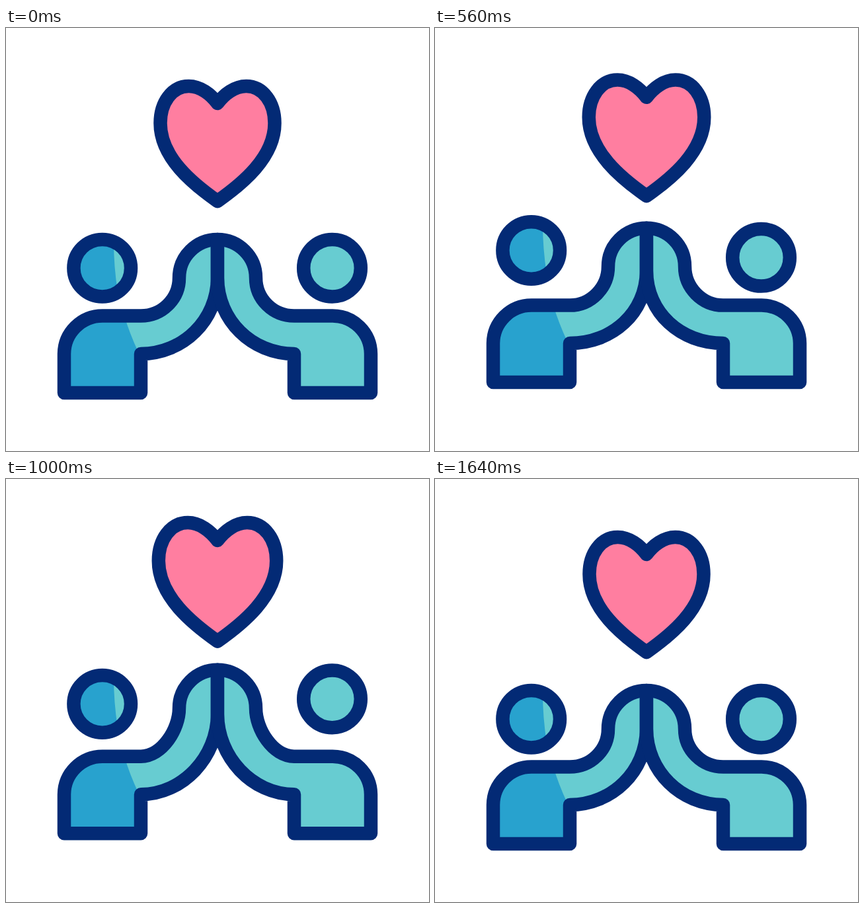
Write an HTML page that moves like this. It is 640 px wide and 640 px high and loops after 1.72 s.

```html
<!DOCTYPE html>
<html lang="en">
<head>
<meta charset="utf-8">
<title>High five</title>
<style>
  html, body { margin: 0; height: 100%; overflow: hidden; background: #fff; }
  svg { display: block; width: 100%; height: 100%; }
  .line { stroke: #032a75; stroke-width: 20.5; stroke-linejoin: round; }
  .teal { fill: #67ccd1; }
  .blue { fill: #28a2ce; }
</style>
</head>
<body>
<svg viewBox="0 0 640 640">
  <path id="heart" class="line" fill="#ff7ea0"
    d="M0-61C-10-74.5-26-87-43.500-87C-69-87-86.500-62-86.500-31C-86.500 21-37 61 0 87C37 61 86.500 21 86.500-31C86.500-62 69-87 43.500-87C26-87 10-74.500 0-61Z"/>
  <g id="left">
    <path class="body teal"/>
    <path class="shade blue" d="M88 552V493A58 58 0 0 1 146 435.500H179Q187 462 200 490L204 493V552Z"/>
    <path class="body line" fill="none"/>
    <g class="head">
      <circle class="teal" cx="145.700" cy="363.200" r="43.300"/>
      <path class="blue" d="M163 323.500A43.300 43.300 0 1 0 169 399.500Q163 360 163 323.500Z"/>
      <circle class="line" cx="145.700" cy="363.200" r="43.300" fill="none"/>
    </g>
  </g>
  <g id="right" transform="translate(640) scale(-1 1)">
    <path class="body line teal"/>
    <circle class="head line teal" cx="146.500" cy="363.200" r="43.300"/>
  </g>
</svg>
<script>
const LOOP = 1720, STEP = 40;
const find = selector => document.querySelector(selector);
const bodies = document.querySelectorAll('.body');

function ease(t, from, to) {
  const x = Math.min(1, Math.max(0, (t - from) / (to - from)));
  return x * x * (3 - 2 * x);
}

// Rises from 0 to 1 over a..b, stays, and returns over c..d.
const swell = (t, a, b, c, d) => ease(t, a, b) - ease(t, c, d);

const shift = (selector, y) => find(selector).setAttribute('transform', `translate(0 ${y})`);

// The curve handles keep their length while the arm stretches.
function bodyPath(lift, hand, elbow) {
  const shoulder = 435.5 + lift, corner = 493 + lift, base = 552 + lift;
  const wrist = 378 + lift + hand, fork = 378 + lift + elbow;
  return `M88 ${base}V${corner}A58 58 0 0 1 146 ${shoulder}H204
    C236 ${shoulder} 262 ${wrist + 32} 262 ${wrist}A58 58 0 0 1 320 ${wrist - 58}V${fork}
    C320 ${fork + 64} 268 ${corner} 204 ${corner}V${base}Z`;
}

function draw(t) {
  const lift = -19.2 * swell(t, 140, 710, 840, 1440);
  const dip = 17.4 * swell(t, 50, 370, 375, 755);
  const rise = swell(t, 375, 755, 840, 1300);
  const path = bodyPath(lift, dip - 21.5 * rise, dip - 8.5 * rise);
  for (const body of bodies) body.setAttribute('d', path);
  shift('.shade', lift);
  shift('#left .head', lift - 14 * swell(t, 290, 680, 700, 1300));
  shift('#right .head', lift - 14.5 * swell(t, 560, 980, 1000, 1520));

  const scale = 1 + 0.12 * (swell(t, 120, 360, 360, 600) + swell(t, 600, 840, 840, 1080));
  const y = 175 - 19.2 * swell(t, 280, 880, 1000, 1600);
  const heart = find('#heart');
  heart.setAttribute('transform', `translate(320 ${y}) scale(${scale})`);
  heart.style.strokeWidth = 20.5 / scale;
}

const start = performance.now();
function tick() {
  const t = (performance.now() - start) % LOOP;
  draw(Math.floor(t / STEP) * STEP);
  requestAnimationFrame(tick);
}
tick();
</script>
</body>
</html>
```
